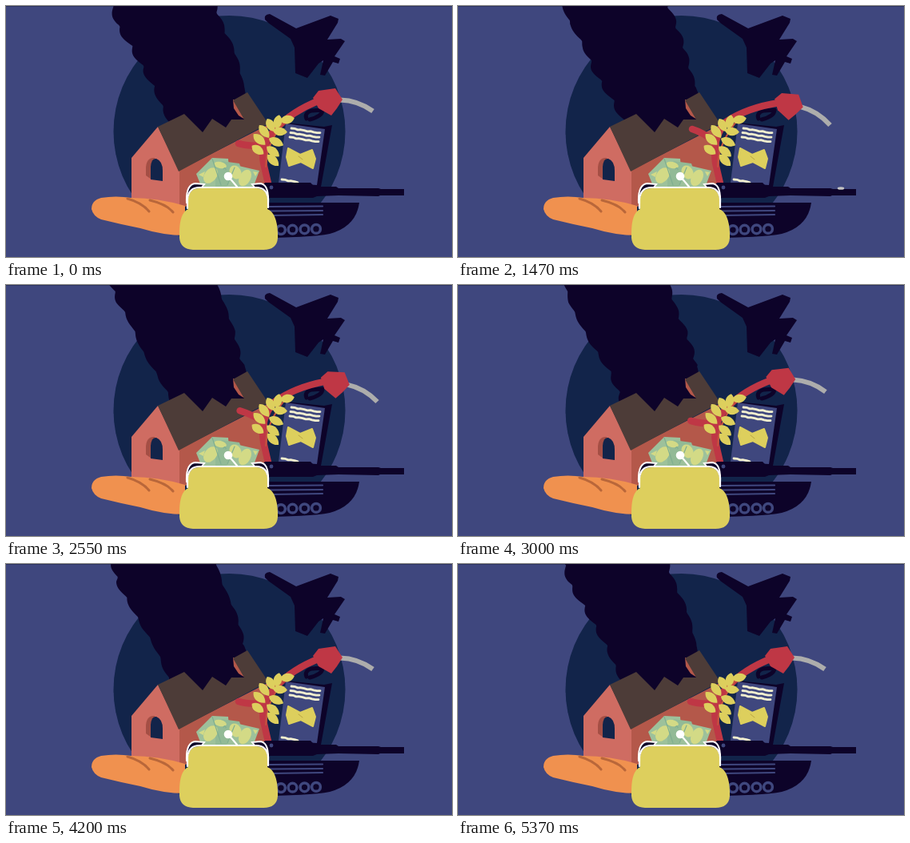
Animation, 558 px wide and 314 px high, one loop 5400 ms. Source, as an HTML page:

```html
<!DOCTYPE html>
<html lang="en">
<head>
<meta charset="utf-8">
<title>Rising costs</title>
<style>
  html, body { margin: 0; width: 100%; height: 100%; overflow: hidden; background: #3f477e; }
  svg { display: block; width: 100vw; height: 100vh; }
  .night { fill: #0d0329; }
  .gold { fill: #ddcf5d; }
  .red { fill: #bf3745; }
  .line { fill: none; stroke-linecap: round; stroke-linejoin: round; }
  .hose { stroke: #bf3745; stroke-width: 8.5; }
  .cream { stroke: #f2efcf; stroke-width: 2.8; }
  .blue { stroke: #3f477e; }
</style>
</head>
<body>
<svg viewBox="0 0 558 314" preserveAspectRatio="none">
  <rect width="558" height="314" fill="#3f477e"/>
  <rect width="558" height="1" fill="#2c335f"/>
  <circle cx="279.5" cy="157" r="145" fill="#12244a"/>

  <!-- plane -->
  <path class="night" d="M324 17Q322 11 330 10L363 28 406 12 416 16 415 21 402 42 419 41 424 44 411 63 418 66 416 72 409 70 399 87 393 86 397 68 391 72 377 90 362 84 361 52 356 41 328 21Z"/>

  <path id="smoke" class="night"/>

  <!-- house -->
  <path fill="#b4584a" d="M216 206L327 149V235L217 252ZM284 117L290 118 299 142 291 137 285 128Z"/>
  <path fill="#cf6c62" d="M190 151L217 206V250L157 242V190Z"/>
  <path fill="#4d3c38" d="M190 151L223 135 246 158 258 141 275 152 282 142 298 142 284 118 302 108 328 147 216 207Z"/>
  <path fill="#a54f45" d="M175 212V202Q176 189 186 190L193 217 182 217Z"/>
  <path fill="#12244a" d="M181 217V201Q182 190 188 191 196 194 196 206V219Z"/>

  <!-- bread -->
  <path fill="#f0914f" d="M107 254Q107 243 119 240 137 237 157 240 190 240 224 250V287Q197 287 168 278 143 273 119 267 109 263 107 254Z"/>
  <g class="line" stroke="#b9673a" stroke-width="3">
    <path d="M152 241Q170 246 179 257M180 243Q201 248 209 258"/>
  </g>

  <!-- packet -->
  <path class="line" stroke="#0d0329" stroke-width="5" d="M376 141Q373 134 382 131L396 130Q396 138 380 142"/>
  <path class="night" d="M349 146L398 151 408 149 394 226H384Z"/>
  <path fill="#3f477e" d="M350 147L399 154 389 224 341 221Z"/>
  <g class="line cream" id="print"></g>
  <path class="gold" stroke="#ddcf5d" stroke-width="2" stroke-linejoin="round" d="M353 178L368 186 383 180 387 191 384 203 369 195 354 200 351 189Z"/>
  <path class="line" stroke="#b9a543" stroke-width="1" d="M366 188L371 192"/>

  <!-- hose and nozzle -->
  <path id="hose" class="line hose"/>
  <g id="nozzle">
    <path class="line" stroke="#adadac" stroke-width="6" style="stroke-linecap:butt" d="M418 117.500Q440 118 459 131.500"/>
    <path class="red" d="M384 115L391 106 412 103 421 117 414 128 407 137 391 128Z"/>
  </g>

  <!-- tank -->
  <path class="night" d="M310 235L324 221H381L386 226H413L416 228H466L469 229H498V237H468L466 238 416 237 389 238 384 240H310Z"/>
  <path class="night" d="M310 246H442Q438 276 405 285 380 290 310 290Z"/>
  <circle cx="332" cy="227" r="2.400" fill="#3f477e"/>
  <g class="line blue" stroke-width="2.200">
    <path d="M330 251L396 250.500M330 256.500L396 256M330 262L396 261"/>
  </g>
  <g class="line blue" stroke-width="3.500" id="wheels"></g>
  <ellipse id="drop" fill="#c4c4c4"/>

  <!-- wheat -->
  <path class="line" stroke="#c4503f" stroke-width="2" d="M325 201Q325 172 351 141"/>
  <g id="wheat" class="gold"></g>

  <!-- money -->
  <g fill="#9dc19b">
    <path d="M238 210L258 190 278 191 281 230H246Z"/>
    <path fill="#92ba96" d="M262 202L270 194 292 197 303 230H262Z"/>
    <path d="M287 199L317 206 308 230H274Z"/>
  </g>
  <g fill="#d3da86">
    <ellipse cx="256" cy="212" rx="7.500" ry="11" transform="rotate(38 256 212)"/>
    <ellipse cx="268" cy="199" rx="8" ry="4" transform="rotate(12 268 199)"/>
    <ellipse cx="287" cy="208" rx="7" ry="9" transform="rotate(-30 287 208)"/>
    <ellipse cx="299" cy="215" rx="7" ry="11" transform="rotate(28 299 215)"/>
    <path d="M241 211L249 207 247 214ZM309 207L315 208 312 213Z"/>
  </g>
  <path class="line" stroke="#7fae90" stroke-width="1.200" d="M258 191L269 224M286 202L277 224M272 204q3-3 3 1"/>

  <!-- purse: dark lining at the corners, then the front -->
  <path class="night" stroke="#fff" stroke-width="2" d="M226 246Q225 223 237 222L248 223 244 228 230 246ZM328 246Q329 223 318 222L308 223 312 228 325 246Z"/>
  <path class="gold" d="M228 254V240Q230 228 242 228H313Q325 228 327 240V254Q339 259 340 284V290Q339 305 322 305H234Q218 304 217 290V284Q217 259 228 254Z"/>
  <path class="line" stroke="#fff" stroke-width="2.200" d="M227 253V241Q229 227 242 227H313Q326 227 328 241V252M278 213L289 226"/>
  <circle cx="278" cy="213" r="5.300" fill="#fff"/>
</svg>
<script>
const LOOP = 5400;
const TAU = 2 * Math.PI;
const el = id => document.getElementById(id);
const mix = (a, b, p) => a + (b - a) * p;
const ease = u => (1 - Math.cos(Math.PI * Math.min(1, Math.max(0, u)))) / 2;

// Static repeats
const wavy = (x, y, w) => {
  let d = `M${x} ${y}`;
  for (let i = 4; i <= w; i += 4) d += `L${x + i} ${y + i * 0.17 + Math.sin(i) * 0.5}`;
  return `<path d="${d}"/>`;
};
el('print').innerHTML = [[357, 153, 36], [356, 158.5, 36], [355, 164, 36], [345, 217, 20]]
  .map(a => wavy(...a)).join('');
el('wheels').innerHTML = [329, 344, 358.5, 373.5, 388]
  .map((x, i) => `<circle cx="${x}" cy="${280.5 - i * 0.4}" r="5.4"/>`).join('');

// Each grain: centre, half length, tilt
const grains = [
  [315, 180, 9, 35], [317, 167, 10, 42], [323, 157, 10, 52], [331, 149, 9, 62], [340, 145, 9, 102],
  [334, 193, 10, 45], [334, 182, 10, 38], [338, 170, 10, 25], [343, 157, 9, 5], [352, 142, 9, -12]
];
el('wheat').innerHTML = grains.map(([x, y, r, a]) =>
  `<path transform="translate(${x} ${y}) rotate(${a})" d="M${-r} 0C-5 -7 4 -7 ${r} 0C4 7 -5 7 ${-r} 0Z"/>`).join('');

// Smoke outline: a guide line with lobes that drift upward
const leftGuide = [[130, -6], [139, 22], [156, 52], [170, 80], [190, 113], [212, 160]];
const rightGuide = [[262, -6], [273, 26], [286, 58], [294, 86], [300, 108], [300, 160]];

function at(guide, y) {
  let i = 1;
  while (i < guide.length - 1 && guide[i][1] < y) i++;
  const [a, b] = [guide[i - 1], guide[i]];
  return mix(a[0], b[0], (y - a[1]) / (b[1] - a[1]));
}

function lobe(y, k, seed) {
  const puff = Math.abs(Math.sin(y / 25 * Math.PI + TAU * k * 6 + seed));
  const size = 4.5 + 2 * Math.sin(TAU * k * 3 + y / 40 + seed);
  const sway = 1.5 * Math.sin(TAU * k * 5 + y / 17 + seed * 2);
  return (puff - 0.6) * size + sway;
}

function drawSmoke(k) {
  const left = [], right = [];
  for (let y = -6; y <= 160; y += 2) {
    left.push(`${(at(leftGuide, y) - lobe(y, k, 0)).toFixed(1)} ${y}`);
    const calm = y > 100 ? 0.25 : 0.8;
    right.unshift(`${(at(rightGuide, y) + calm * lobe(y, k, 2)).toFixed(1)} ${y}`);
  }
  el('smoke').setAttribute('d', `M${left.concat(right).join('L')}Z`);
}

function drawPump(t) {
  const p = ease((t - 600) / 700) - ease((t - 2300) / 900);
  const m = (a, b) => mix(a, b, p).toFixed(1);
  el('nozzle').setAttribute('transform',
    `translate(${m(0, 10.5)} ${m(0, 5.5)}) rotate(${m(0, 13)} 404 120)`);
  el('hose').setAttribute('d',
    `M${m(390, 402)} ${m(119, 121)}Q${m(358, 362)} ${m(132, 127)} ${m(338, 335)} ${m(153, 145)}` +
    `Q318 ${m(174, 166)} 322 196L328 222` +
    `M${m(291, 293)} ${m(172, 154)}Q${m(303, 306)} ${m(176, 158)} ${m(326, 322)} ${m(174, 170)}`);
}

function drawDrop(t) {
  const fall = (t - 1140) / 300;
  const splat = (t - 1440) / 120;
  const drop = el('drop');
  drop.style.display = fall > 0 && splat < 1 ? '' : 'none';
  const f = Math.min(1, Math.max(0, fall));
  const s = Math.max(0, splat);
  const set = { cx: mix(465, 479, f), cy: mix(150, 228, f * f),
    rx: s ? 4 + s : 2, ry: s ? 2.2 * (1 - Math.min(1, s) * 0.6) : 3 };
  for (const key in set) drop.setAttribute(key, set[key]);
}

function frame() {
  const t = Math.floor(performance.now() % LOOP / 30) * 30;
  drawSmoke(t / LOOP);
  drawPump(t);
  drawDrop(t);
  requestAnimationFrame(frame);
}
frame();
</script>
</body>
</html>
```
